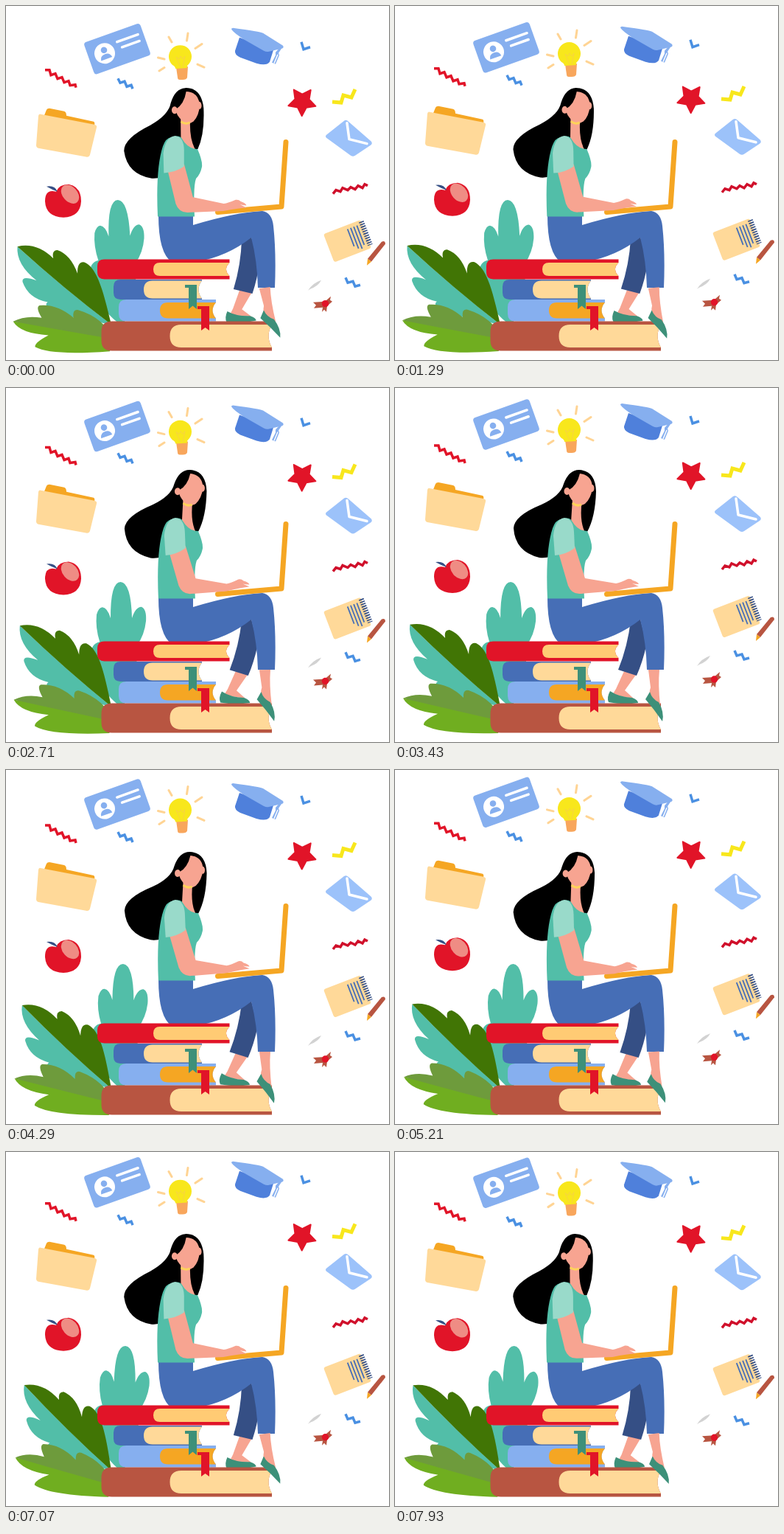
Write an HTML page that moves like this. It is 520 px wide and 480 px high and loops after 8 s.

```html
<!DOCTYPE html>
<html lang="en">
<head>
<meta charset="utf-8">
<title>Learning on a stack of books</title>
<style>
html, body { margin: 0; width: 100%; height: 100%; overflow: hidden; background: #fff; }
svg { display: block; width: 100%; height: 100%; }
.line { fill: none; stroke-width: 3.5; }
.round { stroke-linecap: round; stroke-linejoin: round; }
.skin { fill: #f7a491; }
.teal { fill: #52bea8; }
.shoe { fill: #3d9079; }
.sky { fill: #86afef; }
.peach { fill: #ffd999; }
.orange { fill: #f5a623; }
.red { fill: #e11428; }
.brown { fill: #b85541; }
.denim { fill: #466eb6; }
.navy { fill: #354f85; }
</style>
</head>
<body>
<svg viewBox="0 0 520 480">
  <!-- leaves -->
  <path id="leafTop" class="teal" d="M155 432Q116 400 116 362Q116 346 128 344Q122 325 124 307Q127 297 132 297Q139 298 143 312Q143 263 157 263Q171 264 172 312Q177 297 185 297Q192 300 191 316Q189 335 178 350Q180 420 155 432Z"/>
  <g id="leafLeft">
    <path class="teal" d="M20 321Q17 345 44 368Q24 360 25 369Q32 392 58 398Q50 402 70 415L143 432Q75 375 20 321Z"/>
    <path fill="#417505" d="M20 321Q46 316 68 339Q66 328 74 328Q92 335 100 361Q100 344 110 346C126 354 133 380 143 432Q80 380 20 321Z"/>
  </g>
  <g id="leafLow">
    <path fill="#70ae20" d="M11 421Q20 438 58 442Q38 451 39 457Q60 470 140 468L146 452Q75 430 11 421Z"/>
    <path fill="#6e9b3c" d="M11 421Q28 413 50 418Q42 403 48 401Q72 400 93 420Q92 408 100 410Q134 422 146 452Q75 436 11 421Z"/>
  </g>

  <!-- woman -->
  <g id="farLeg">
    <path class="skin" d="M311 384L327 389L312 410L324 421L295 416L300 408Z"/>
    <path class="shoe" d="M292 411Q304 419 322 420Q330 423 330 427Q310 430 290 426Q287 420 292 411Z"/>
    <path class="navy" d="M320 315L333 313Q339 335 341 350Q336 372 328 390L303 382Q316 350 320 315Z"/>
  </g>
  <g id="head">
    <path d="M250 111Q272 112 273 140Q272 175 261 195L250 195L240 180Q225 200 222 222Q210 232 196 230Q163 222 161 190Q162 173 199 158Q225 146 229 130Q236 111 250 111Z"/>
    <path class="skin" d="M241 150L239 182Q246 192 258 196Q250 180 254 152Z"/>
    <ellipse class="skin" cx="233.5" cy="140" rx="4" ry="5"/>
    <ellipse class="skin" cx="267.5" cy="136" rx="3" ry="5"/>
    <path class="skin" d="M251 116Q268 118 268 136Q266 150 258 157Q250 162 243 155Q235 147 235 139Q247 133 251 116Z"/>
    <path class="line" style="stroke-width:3" stroke="#ffd35a" d="M241 156Q247 161 253 158"/>
  </g>
  <path class="denim" d="M207 284H254V297Q310 280 348 278Q361 280 363 298Q367 335 365 382H342Q341 345 333 314Q300 340 258 347H225Q207 335 207 284Z"/>
  <path id="torso" class="teal" d="M225 178Q237 174 240 180Q248 194 261 194Q268 210 267 218Q265 228 259 234Q255 245 257 285.500H207Q204 220 214 190Q218 179 225 178Z"/>
  <path class="line round" style="stroke-width:7" stroke="#f5a623" d="M287.500 279.500L374 272L380 184.500"/>
  <g id="arm">
    <path class="skin" d="M221 220L244 214L258 258L300 265Q306 264 316 259Q320 258 323 261Q330 263 331 266Q326 266 322 265L331 269Q320 270 300 275L252 279Q240 280 235 268Z"/>
    <path fill="#99daca" d="M230 176Q242 177 243 195L244 217Q232 226 217 227L215 200Q217 178 230 176Z"/>
  </g>

  <g id="books"></g>
  <g id="nearLeg">
    <path class="skin" d="M344 382H359Q357 402 360 430L347 424Q344 414 347 406Z"/>
    <path class="shoe" d="M346 412L340 422Q352 436 363 452Q366 440 358 426Q349 422 346 412Z"/>
  </g>
  <path class="shoe" d="M243 378H259V411L253.500 406.500L248 411V382H243Z"/>
  <path class="red" d="M260 407H276V440L270.500 436L265 440V411H260Z"/>

  <!-- floating things -->
  <g id="slow">
    <g transform="translate(151 49.500) rotate(-19.600)">
      <rect class="sky" x="-40.500" y="-23" width="81" height="46" rx="4"/>
      <circle cx="-18" r="14" fill="#fff"/>
      <circle class="sky" cx="-17.500" cy="-4.500" r="4.300"/>
      <path class="sky" d="M-26 8Q-25 1 -18 1Q-11 1 -10 8Z"/>
      <path class="line round" stroke="#fff" d="M3 -9H33M7 0H32"/>
    </g>

    <path fill="#4f80db" d="M317 34L311 52Q310 57 318 61L340 69Q354 73 358 67L363 51Z"/>
    <path class="sky" d="M308 21Q345 26 349 28L376 45Q378 48 374 49L357 53Q354 54 350 52L322 36Q306 25 306 22Z"/>
    <path class="sky" d="M373 46H376L370 55L371 58L366 70L361 68L366 58V54Z"/>
    <path class="line" style="stroke-width:1.500" stroke="#fff" d="M369 57L364 69"/>

    <path class="line" stroke="#e11428" d="M53 78L59 78L61 85L67 83L70 90L76 88L79 95L85 93L87 99L94 98L95 102"/>
    <path class="line" stroke="#d0102b" d="M444 246L448 241L454 243L457 238L464 241L468 237L474 240L478 235L484 238L487 233L491 235"/>

    <path class="red" d="M68 243Q72 233 85 233Q102 236 102 256Q101 277 78 278Q54 277 53 256Q53 239 68 243Z"/>
    <ellipse cx="87" cy="246.500" rx="14.500" ry="10" fill="#ef8c84" transform="rotate(48 87 246.500)"/>
    <path class="navy" d="M55 236Q66 234 70 243Q62 240 55 236Z"/>

    <path fill="#9cc2fa" d="M435 166L459 147Q462 145 465 148L496 175Q498 178 495 180L474 194Q471 196 468 194L435 170Q433 168 435 166Z"/>
    <path class="line round" stroke="#fff" d="M463 150L466 172L490 178"/>

    <g transform="translate(463.500 310) rotate(-21)">
      <rect class="peach" x="-27" y="-20.500" width="54" height="41" rx="3"/>
      <path class="line" style="stroke-width:1.800" stroke="#466eb6" d="M6 -15V10M10.500 -15V15M15 -15V17M19.500 -15V13"/>
      <path class="line" style="stroke-width:7;stroke-dasharray:1.700 1.600" stroke="#354f85" d="M27 -18V16"/>
    </g>

    <path class="brown" d="M510 311Q515 309 515 314L496 338L491 334Z"/>
    <path class="orange" d="M491 334L496 338L490 343Z"/>
    <path fill="#d2d2d2" d="M410 377Q416 367 428 363Q424 371 413 375Z"/>
    <path class="brown" d="M417 393L433 392L441 385L440 390L443 392L436 398L435 406L432 403L429 406L430 400L418 401L421 397Z"/>
    <circle class="red" cx="433.500" cy="395" r="4.700"/>
  </g>

  <g id="middle">
    <path class="line" stroke="#4a90e2" d="M401 38L404 48L413 45"/>
    <path class="orange" d="M49 145L55 130Q56 128 59 128L79 132Q82 133 82 138L119 146Q121 147 120 151L118 158Z"/>
    <path class="peach" d="M47 136L120 150Q124 151 123 154L114 191Q113 194 110 194L44 182Q41 181 41 178L44 138Q45 135 47 136Z"/>
  </g>

  <g id="early">
    <path class="line round" style="stroke-width:3" stroke="#ffd494" d="M221 30L225 37M247 25L245.500 35M257 45.500L266 39.500M260 67L269 71M206.500 58L215 60M208 76L215 71.500"/>
    <path fill="#f8a65c" d="M231 71L247 70L246 85Q245 88 240 88H236Q233 88 233 85Z"/>
    <path fill="#f8e71c" d="M230 73Q230 70 226 68A15.500 15.500 0 1 1 247 68Q245 70 246 72Z"/>
    <path class="line" style="stroke-width:.8" stroke="#f7d04a" d="M237 71L231 57L235 60L237 56L240 60L243 56L240 71"/>
    <path id="star" class="red round" stroke="#e11428" stroke-width="2"/>
    <path class="line" style="stroke-width:5" stroke="#f8e71c" d="M443 118L455 119L458 109L469 112L474 101"/>
  </g>

  <g id="earliest" class="line" stroke="#4a90e2">
    <path d="M152 86L155 92L161 90L164 97L170 95L172 100"/>
    <path d="M461 356L464 363L471 361L474 368L481 366"/>
  </g>
</svg>
<script>
const LOOP = 8000, FLOAT = 15, SWAY = 7.5, REST = 3.43;
const $ = id => document.getElementById(id);

function book(x, y, right, height, pageX, cover, page, lip) {
  const bottom = y + height, mid = y + height / 2;
  const shape = (left, top, end, r, hollow) =>
    `M${left + r} ${top}H${right}${hollow}V${end}H${left + r}Q${left} ${end} ${left} ${end - r}V${top + r}Q${left} ${top} ${left + r} ${top}Z`;
  const hollow = `V${y + lip}Q${right - 9} ${mid} ${right} ${bottom - lip}`;
  return `<path class="${cover}" d="${shape(x, y, bottom, height * .35, hollow)}"/>` +
    `<path fill="${page}" d="${shape(pageX, y + lip, bottom - lip, height / 2 - lip, hollow)}"/>`;
}

$('books').innerHTML =
  book(146, 371, 266, 27, 187, 'denim', '#ffd999', 1.5) +
  book(153, 398, 285, 29.5, 209, 'sky', '#f5a623', 4) +
  book(124, 343.5, 303.5, 27, 200, 'red', '#ffcb74', 4.5) +
  book(129.5, 427.5, 361, 40, 222.5, 'brown', '#ffd999', 4.5);

const starPoints = Array.from({ length: 10 }, (_, i) => {
  const angle = (-125 + 36 * i) * Math.PI / 180, r = i % 2 ? 10 : 19.5;
  return [402 + r * Math.cos(angle), 117.5 + r * Math.sin(angle)].map(v => v.toFixed(1)).join(' ');
});
$('star').setAttribute('d', `M${starPoints.join('L')}Z`);

const move = (id, transform) => $(id).setAttribute('transform', transform);
const turn = (id, angle, x, y, shift = 0) =>
  move(id, `translate(${shift} 0) rotate(${angle} ${x} ${y})`);
const wave = (t, lowest) => -Math.cos(2 * Math.PI * (t - lowest) / FLOAT);
const lift = (id, t, amount, lowest) =>
  move(id, `translate(0 ${amount * (wave(t, lowest) - wave(REST, lowest))})`);

function draw(now) {
  const t = now % LOOP / 1000;
  lift('slow', t, 8.5, 7.1);
  lift('middle', t, 9, 6.5);
  lift('early', t, 9.3, 5.9);
  lift('earliest', t, 9.3, 5.4);

  const bend = -wave(t, 7.1);
  turn('leafTop', 1.8 * bend, 158, 428);
  turn('leafLeft', 2.4 * bend, 143, 432);
  turn('leafLow', 3 * bend, 143, 450);

  // 0 when the figure leans forward, 1 when she leans back
  const lean = (1 + Math.cos(2 * Math.PI * (t + .2) / SWAY)) / 2;
  turn('head', -4.2 * lean, 249, 190, -lean);
  turn('arm', 2.6 * lean, 230, 190, -lean);
  move('torso', `translate(${-lean} 0)`);
  turn('farLeg', -5 * lean, 330, 315);
  turn('nearLeg', -8 * lean, 352, 384);
  requestAnimationFrame(draw);
}
requestAnimationFrame(draw);
</script>
</body>
</html>
```
